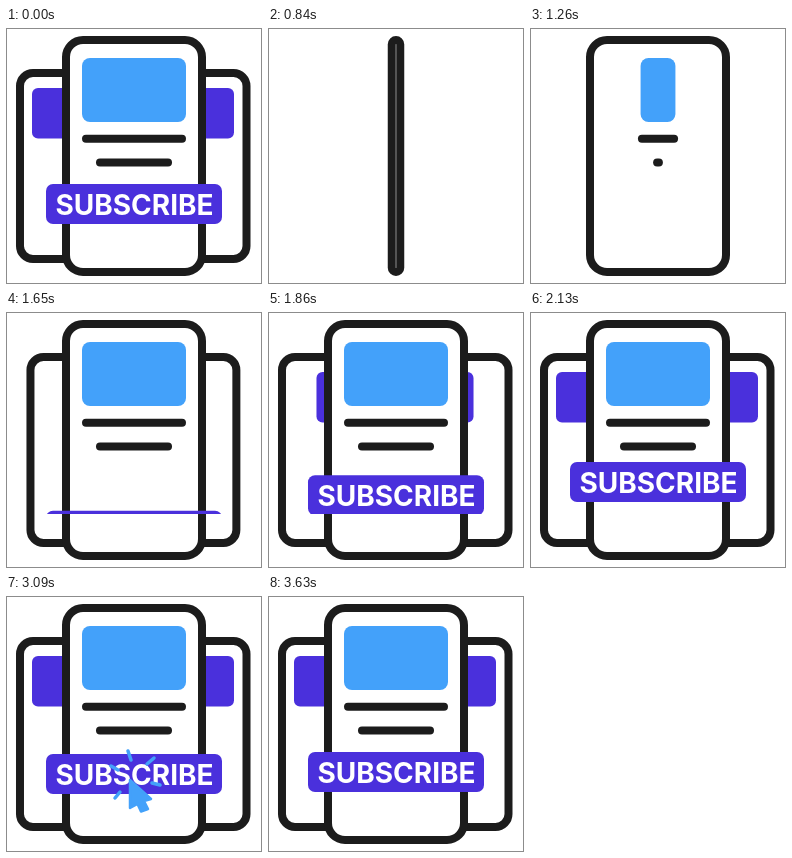
An HTML page with a canvas that plays this animation: 256 px wide and 256 px high, repeating every 3.99 s.

```html
<!DOCTYPE html>
<html lang="en">
<head>
<meta charset="utf-8">
<title>Subscribe</title>
<style>
html, body { margin: 0; width: 100%; height: 100%; overflow: hidden; background: #fff; }
canvas { display: block; width: 256px; height: 256px; }
</style>
</head>
<body>
<canvas id="stage"></canvas>
<script>
const LOOP = 3990, STEP = 30, FADE_END = 390, BUILD_START = 720;
const INK = '#1c1c1c', BLUE = '#43a1fa', PURPLE = '#4a30dc', WHITE = '#fff';

const canvas = document.getElementById('stage');
const ratio = window.devicePixelRatio || 1;
canvas.width = canvas.height = 256 * ratio;
const ctx = canvas.getContext('2d');
ctx.scale(ratio, ratio);

const ease = p => p < 0.5 ? 4 * p ** 3 : 1 - 4 * (1 - p) ** 3;
const linear = (t, a, b) => Math.min(1, Math.max(0, (t - a) / (b - a)));
const span = (t, a, b) => ease(linear(t, a, b));
const mix = (a, b, p) => a + (b - a) * p;

function roundRect(x, y, w, h, r) {
  ctx.beginPath();
  ctx.roundRect(x, y, w, h, Math.min(r, w / 2, h / 2));
}

function block(x, y, w, h, r, color) {
  if (w <= 0) return;
  roundRect(x, y, w, h, r);
  ctx.fillStyle = color;
  ctx.fill();
}

function card(x, y, w, h, r) {
  block(x, y, w, h, r, WHITE);
  ctx.lineWidth = 8;
  ctx.strokeStyle = INK;
  ctx.stroke();
}

function line(x1, y1, x2, y2, width, color) {
  ctx.beginPath();
  ctx.moveTo(x1, y1);
  ctx.lineTo(x2, y2);
  ctx.lineCap = 'round';
  ctx.lineWidth = width;
  ctx.strokeStyle = color;
  ctx.stroke();
}

function bar(y, half, p) {
  if (p > 0) line(128 - half * p, y, 128 + half * p, y, 8, INK);
}

function sideCards(t) {
  if (t < 1310) return;
  const p = span(t, 1310, 1860);
  const left = mix(61, 14, p), right = mix(195, 240.5, p);
  card(left, 45, 100, 186, 13);
  card(right - 100, 45, 100, 186, 13);
  const grow = span(t, 1660, 2100);
  if (grow > 0) {
    block(mix(62, 26, grow), 60, 50, 50.5, 6, PURPLE);
    block(mix(192, 228, grow) - 50, 60, 50, 50.5, 6, PURPLE);
  }
}

function mainCard(t) {
  const w = 136 * span(t, 720, 1200);
  card(128 - w / 2, 12, w, 232, 17);
  const pic = 104 * span(t, 1050, 1530);
  block(128 - pic / 2, 30, pic, 64, 8, BLUE);
  bar(110.7, 48, span(t, 1050, 1530));
  bar(134.5, 34, span(t, 1170, 1650));
}

function buttonTop(t) {
  if (t < 2100) return mix(202, 150, span(t, 1500, 2100));
  if (t < 3030) return mix(150, 156, span(t, 2100, 2430));
  if (t < 3150) return mix(156, 160, span(t, 3030, 3150));
  return mix(160, 156, span(t, 3150, 3390));
}

function button(t) {
  if (t < 1500) return;
  const top = buttonTop(t);
  ctx.save();
  ctx.beginPath();
  ctx.rect(0, 0, 256, 202);
  ctx.clip();
  block(40, top, 176, 40, 7, PURPLE);
  ctx.font = '700 28px Inter, Lato, sans-serif';
  ctx.textAlign = 'center';
  ctx.textBaseline = 'alphabetic';
  ctx.fillStyle = WHITE;
  ctx.fillText('SUBSCRIBE', 128.5, top + 30.5);
  ctx.restore();
}

// Each ray: inner point, outer point.
const RAYS = [
  [125, 164, 122, 155], [141, 168, 148, 162], [146, 187, 154, 189],
  [112, 174, 105, 170], [114, 196, 109, 202]
];

function rays(t) {
  if (t < 3030 || t >= 3240) return;
  const out = linear(t, 3030, 3090), shrink = linear(t, 3120, 3240);
  for (const [x1, y1, x2, y2] of RAYS) {
    line(mix(x1, x2, shrink), mix(y1, y2, shrink),
         mix(x1, x2, out), mix(y1, y2, out), 3.5, BLUE);
  }
}

const ARROW = [[124, 184], [145, 203], [138, 205], [142, 213], [135, 215.5], [131.5, 208], [124, 212]];

function cursor(t) {
  if (t < 2700 || t > 3450) return;
  const drop = 78 * (1 - span(t, 2670, 3030) + span(t, 3150, 3450));
  ctx.save();
  ctx.translate(0, drop);
  ctx.beginPath();
  for (const [x, y] of ARROW) ctx.lineTo(x, y);
  ctx.closePath();
  ctx.lineJoin = 'round';
  ctx.lineWidth = 2.5;
  ctx.strokeStyle = ctx.fillStyle = BLUE;
  ctx.fill();
  ctx.stroke();
  ctx.restore();
}

function scene(t) {
  sideCards(t);
  mainCard(t);
  button(t);
  rays(t);
  cursor(t);
}

function draw(t) {
  ctx.fillStyle = WHITE;
  ctx.fillRect(0, 0, 256, 256);
  if (t < FADE_END) {
    scene(LOOP);
    ctx.globalAlpha = t / FADE_END;
    ctx.fillStyle = WHITE;
    ctx.fillRect(0, 0, 256, 256);
    ctx.globalAlpha = 1;
  } else if (t >= BUILD_START) {
    scene(t);
  }
  ctx.lineWidth = 1;
  ctx.strokeStyle = '#8c8c8c';
  ctx.strokeRect(0.5, 0.5, 255, 255);
}

const start = performance.now();
function tick() {
  const t = (performance.now() - start) % LOOP;
  draw(Math.floor(t / STEP) * STEP);
  requestAnimationFrame(tick);
}
tick();
</script>
</body>
</html>
```
